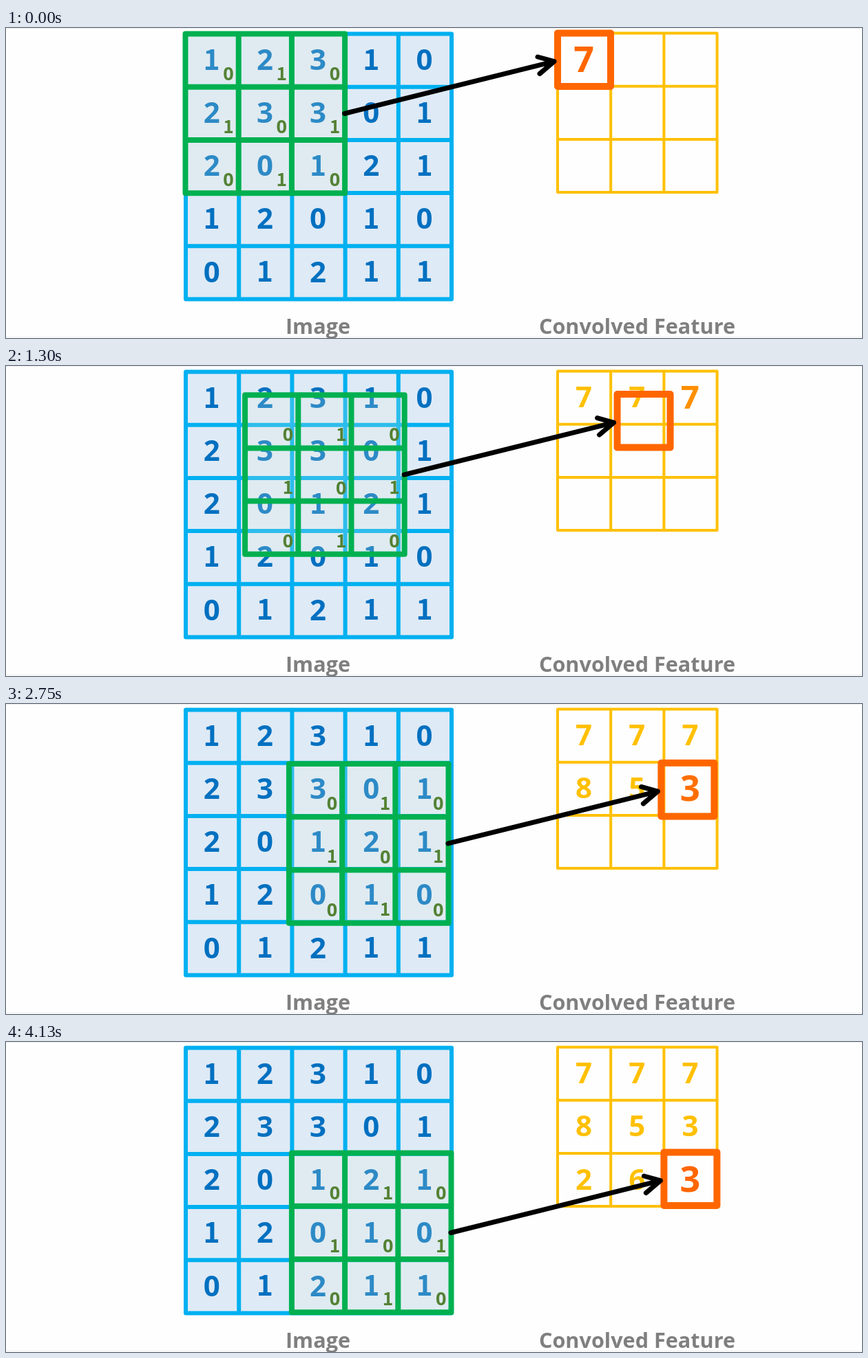
Animation, 1243 px wide and 451 px high, one loop 4.16 s. Source, as an HTML page:

```html
<!DOCTYPE html>
<html lang="en">
<head>
<meta charset="utf-8">
<title>Convolution</title>
<style>
  html, body { margin: 0; width: 100%; height: 100%; overflow: hidden; background: #fefefe; }
  svg { display: block; width: 100%; height: 100%; }
  text { font-family: "Open Sans", "Noto Sans", sans-serif; font-weight: 700; text-anchor: middle; }
  .one { font-family: "Noto Sans CJK JP", "Noto Sans CJK SC", Lato, sans-serif; }
</style>
</head>
<body>
<svg id="stage" viewBox="0 0 1243 451"></svg>
<script>
const PITCH = 77.2;
const DROP = 76.5;    // the kernel's travel per row
const LOOP = 4160;
const STEP = 68.75;   // the picture is held for this long
const MOVE = 240;     // slide from one cell to the next
const FADE = 110;     // result appears after the slide
const STARTS = [170, 672, 1196, 1699, 2209, 2727, 3240, 3761];
const PIXELS = ["12310", "23301", "20121", "12010", "01211"];
const KERNEL = ["010", "101", "010"];
const RESULTS = "777853263";

const stage = document.getElementById("stage");

function add(parent, tag, attrs) {
  const node = document.createElementNS("http://www.w3.org/2000/svg", tag);
  for (const key in attrs) node.setAttribute(key, attrs[key]);
  parent.appendChild(node);
  return node;
}

function grid(parent, x, y, count, color, width, fill) {
  const size = count * PITCH;
  add(parent, "rect", { x, y, width: size, height: size, fill, stroke: color,
    "stroke-width": width, "stroke-linejoin": "round" });
  let d = "";
  for (let i = 1; i < count; i++) {
    d += `M${x + i * PITCH} ${y}v${size}M${x} ${y + i * PITCH}h${size}`;
  }
  add(parent, "path", { d, stroke: color, "stroke-width": width, fill: "none" });
}

function sizeText(node, y, size) {
  node.setAttribute("font-size", size);
  node.setAttribute("y", y + size * 0.357);
}

function digit(parent, value, x, y, size, fill) {
  const isOne = value === "1";
  const node = add(parent, "text", { x, fill, class: isOne ? "one" : "" });
  sizeText(node, y, isOne ? size * 0.975 : size);
  node.textContent = value;
  return node;
}

function digits(parent, rows, x, y, size, fill) {
  rows.forEach((row, r) => [...row].forEach((value, c) =>
    digit(parent, value, x + c * PITCH, y + r * PITCH, size, fill)));
}

function label(text, x) {
  add(stage, "text", { x, y: 445, "font-size": 30.6, fill: "#7f7f7f" }).textContent = text;
}

// Static parts
add(stage, "path", { d: "M0 .5H1243M0 449.5H1243", stroke: "#efefef" });
grid(stage, 261, 8.5, 5, "#00b0f0", 6, "#deeaf6");
digits(stage, PIXELS, 298.7, 45.9, 42, "#0070c0");
label("Image", 453);
label("Convolved Feature", 916.5);

// Sliding kernel
const kernel = add(stage, "g", {});
add(kernel, "rect", { x: 260.5, y: 8.6, width: 3 * PITCH, height: 3 * PITCH,
  fill: "#e2efda", "fill-opacity": 0.2 });
grid(kernel, 260.5, 8.6, 3, "#00b050", 8, "none");
digits(kernel, KERNEL, 323, 66.2, 27, "#548235");

// Result grid, result digits, marker and arrow
grid(stage, 801, 7.5, 3, "#ffc000", 4, "none");
const cellOf = i => ({ col: i % 3, row: Math.floor(i / 3) });
const results = [...RESULTS].map((value, i) => {
  const { col, row } = cellOf(i);
  const y = 45.2 + row * PITCH;
  return { y, node: digit(stage, value, 839 + col * PITCH, y, 52, "#ff6600") };
});
const marker = add(stage, "g", {});
add(marker, "rect", { x: 801, y: 7.4, width: 77, height: 77.6, fill: "none",
  stroke: "#ff6600", "stroke-width": 10, "stroke-linejoin": "round" });
add(marker, "path", { d: "M491.5 124.5L796 48.7M772 42L796 48.7L775 66.5", fill: "none",
  stroke: "#000", "stroke-width": 7, "stroke-linecap": "round", "stroke-linejoin": "round" });

const clamp = v => Math.min(1, Math.max(0, v));
const ease = u => u * u * (3 - 2 * u);
const mix = (a, b, u) => a + (b - a) * u;

function draw(ms) {
  const t = Math.floor((ms + 8) / STEP) * STEP;
  const progress = STARTS.map(start => clamp((t - start) / MOVE));

  let col = 0, row = 0;
  progress.forEach((u, i) => {
    const from = cellOf(i), to = cellOf(i + 1), k = ease(u);
    col += (to.col - from.col) * k;
    row += (to.row - from.row) * k;
  });
  const shift = `translate(${col * PITCH} ${row * DROP})`;
  kernel.setAttribute("transform", shift);
  marker.setAttribute("transform", shift);

  results.forEach(({ node, y }, i) => {
    const shown = i ? clamp((t - STARTS[i - 1] - MOVE) / FADE) : 1;
    const settled = i < STARTS.length ? progress[i] : 0;
    node.setAttribute("opacity", shown);
    node.setAttribute("fill", `rgb(255,${Math.round(mix(102, 192, settled))},0)`);
    sizeText(node, y, mix(52, 42, settled));
  });
}

function tick() {
  draw(performance.now() % LOOP);
  requestAnimationFrame(tick);
}
tick();
</script>
</body>
</html>
```
